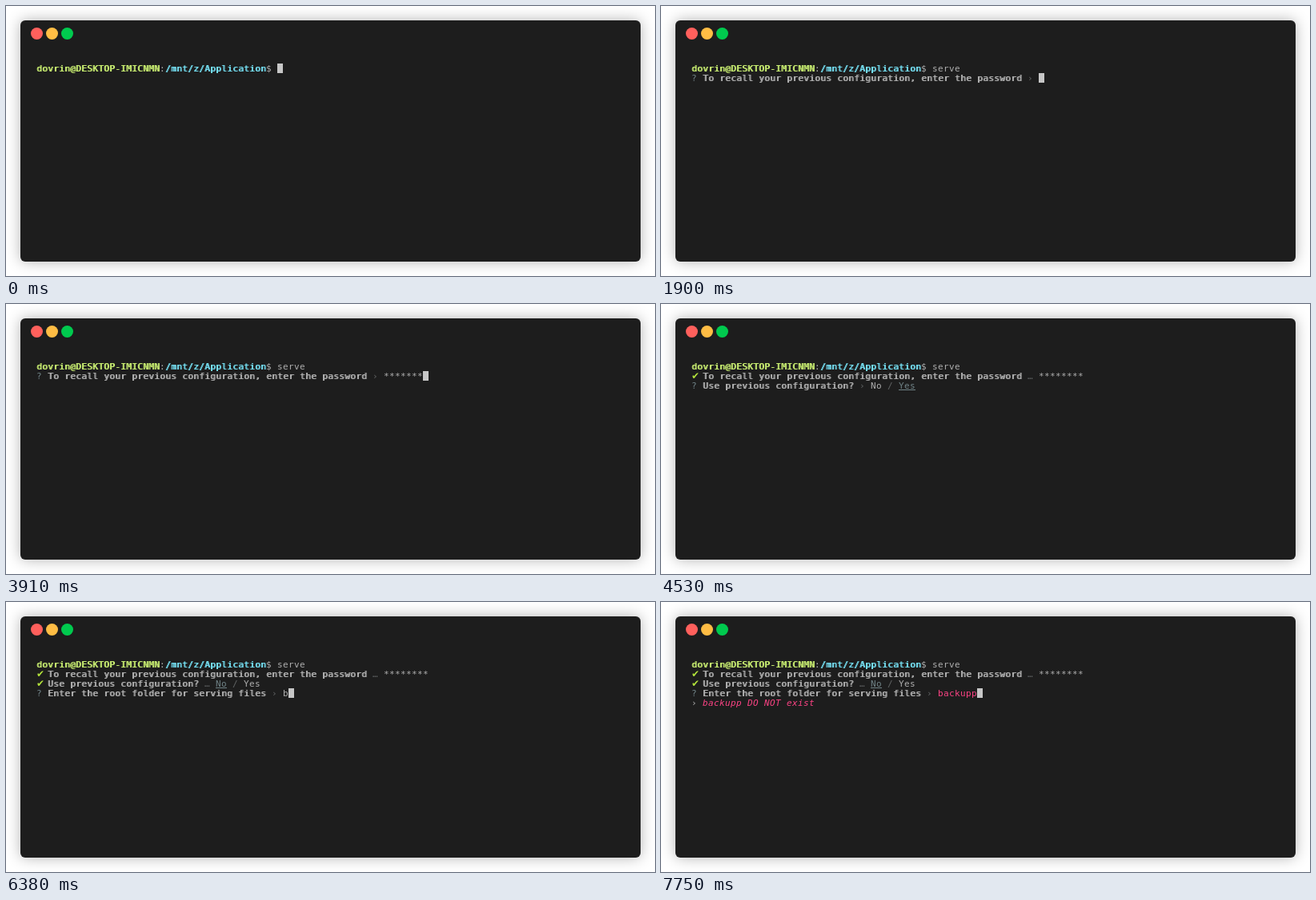
Animation of 811 by 338 pixels, one loop 8 s. Source, as an HTML page with a canvas:

```html
<!DOCTYPE html>
<html lang="en">
<head>
<meta charset="utf-8">
<title>Terminal session</title>
<style>
  html, body { margin: 0; width: 100%; height: 100%; overflow: hidden; background: #fff; }
  #window {
    position: absolute; left: 18px; top: 18px; width: 775px; height: 302px;
    border-radius: 6px; background: #1d1d1d; box-shadow: 0 0 18px #b3b3b3;
  }
  #window i { position: absolute; top: 9px; width: 15px; height: 15px; border-radius: 50%; }
  canvas { position: absolute; left: 0; top: 0; }
</style>
</head>
<body>
<div id="window">
  <i style="left:13px;background:#ff605c"></i>
  <i style="left:32px;background:#ffbd44"></i>
  <i style="left:51px;background:#00ca4e"></i>
</div>
<canvas id="screen" width="811" height="338"></canvas>
<script>
const LOOP = 8000, LEFT = 38, TOP = 72, CELL = 7, ROW = 12;
const FG = '#afafaf', GRAY = '#626566', CYAN = '#708387', GREEN = '#b3e33b',
      LIME = '#c8ed71', BLUE = '#75dff2', PINK = '#fc4384', CURSOR = '#c7c7c7';

// Times at which each key or step appears
const COMMAND = [470, 790, 900, 1240, 1400];
const STARS = [2490, 2750, 2910, 3080, 3430, 3630, 3910, 4090];
const FOLDER = [6380, 6490, 6820, 6960, 7220, 7410, 7550];
const ENTER = 1790, ASK = 1900, CONFIRM = 4530, TOGGLE = 5660, ROOT = 5950, ERROR = 7750;

const ctx = document.getElementById('screen').getContext('2d');
const typed = (text, times, t) => text.slice(0, times.filter(at => at <= t).length);
const run = (text, color = FG, style = '') => ({ text, color, style });

function question(text, done) {
  return [
    done ? run('✔ ', GREEN) : run('? ', CYAN),
    run(text, FG, 'bold'),
    run(done ? ' … ' : ' › ', GRAY)
  ];
}

function choice(text, selected) {
  return selected ? run(text, CYAN, 'underline') : run(text);
}

function linesAt(t) {
  const lines = [[
    run('dovrin@DESKTOP-IMICNMN', LIME, 'bold'), run(':'),
    run('/mnt/z/Application', BLUE, 'bold'), run('$ '),
    run(typed('serve', COMMAND, t))
  ]];
  if (t >= ENTER) lines.push([]);
  if (t >= ASK) lines[1] = [
    ...question('To recall your previous configuration, enter the password', t >= CONFIRM),
    run(typed('********', STARS, t))
  ];
  if (t >= CONFIRM) lines.push([
    ...question('Use previous configuration?', t >= ROOT),
    choice('No', t >= TOGGLE), run(' / ', GRAY), choice('Yes', t < TOGGLE)
  ]);
  if (t >= ROOT) lines.push([
    ...question('Enter the root folder for serving files', false),
    run(typed('backupp', FOLDER, t), t >= ERROR ? PINK : FG)
  ]);
  if (t >= ERROR) lines.push([run('› '), run('backupp DO NOT exist', PINK, 'italic')]);
  return lines;
}

function drawRun({ text, color, style }, x, y) {
  ctx.fillStyle = color;
  const slant = style === 'italic' ? 'italic ' : '';
  [...text].forEach((char, i) => {
    const left = x + i * CELL;
    ctx.font = char === '✔'
      ? '12px "DejaVu Sans", sans-serif'
      : slant + '11px "DejaVu Sans Mono", monospace';
    ctx.fillText(char, left, y + 10);
    if (style === 'bold') ctx.fillText(char, left + 1, y + 10);
  });
  if (style === 'underline') ctx.fillRect(x, y + 10 + 1, text.length * CELL, 1);
}

function draw(t) {
  ctx.clearRect(0, 0, 811, 338);
  const lines = linesAt(t);
  const cursorRow = t >= ERROR ? 3 : lines.length - 1;
  lines.forEach((line, row) => {
    let x = LEFT;
    const y = TOP + row * ROW;
    for (const part of line) {
      drawRun(part, x, y);
      x += part.text.length * CELL;
    }
    const hidden = t >= CONFIRM && t < ROOT;
    if (row === cursorRow && !hidden) {
      ctx.fillStyle = CURSOR;
      ctx.fillRect(x, y, CELL, ROW);
    }
  });
}

const start = performance.now();
function tick() {
  draw((performance.now() - start) % LOOP);
  requestAnimationFrame(tick);
}
tick();
</script>
</body>
</html>
```
